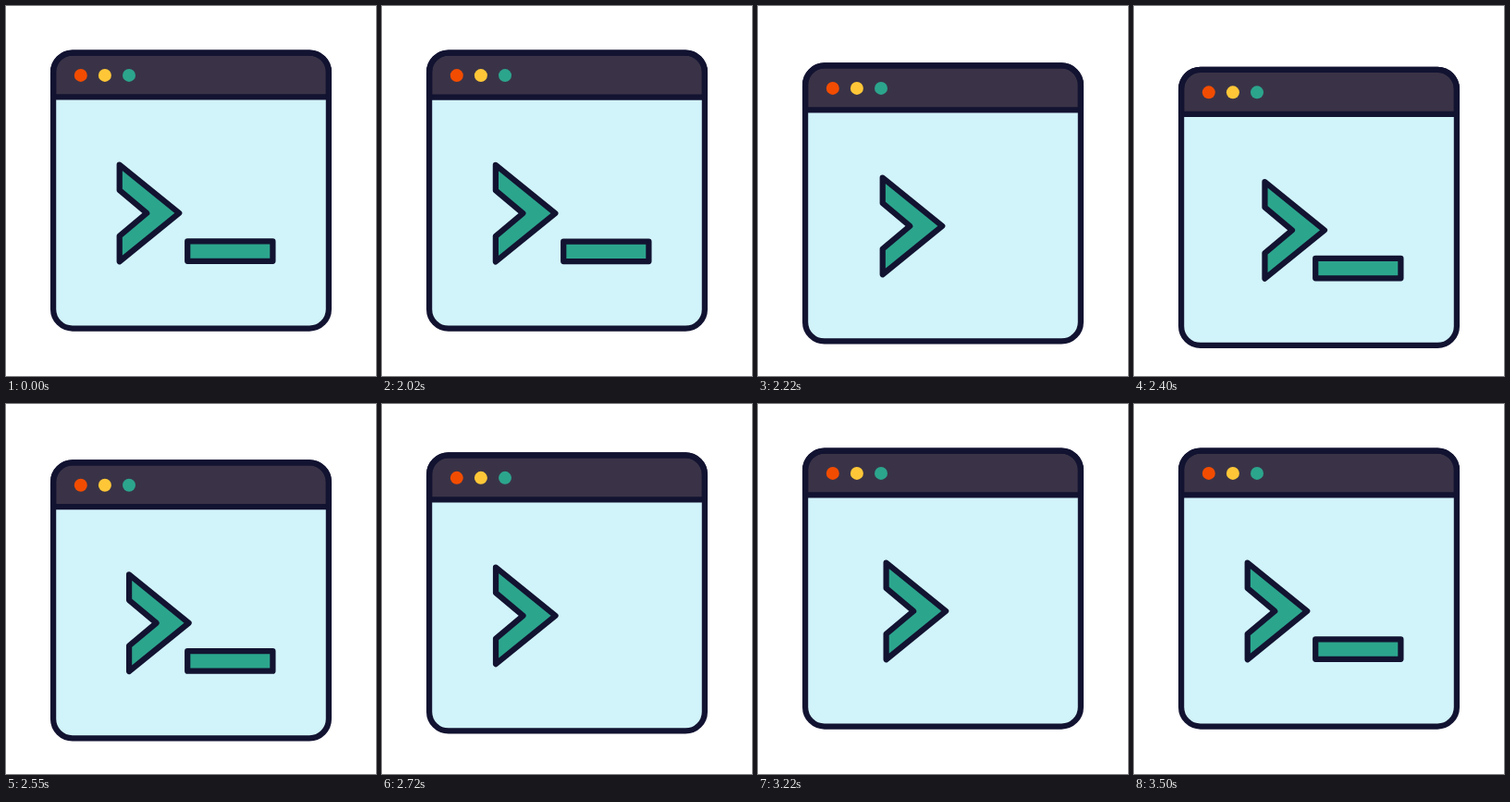
Write an HTML page that moves like this. It is 400 by 400 pixels and loops after 3.52 s.

```html
<!DOCTYPE html>
<html lang="en">
<head>
<meta charset="utf-8">
<title>Terminal</title>
<style>
  html, body { margin: 0; width: 100%; height: 100%; overflow: hidden; background: #fff; }
  svg { display: block; width: 100%; height: 100%; }
  .ink { stroke: #121331; stroke-width: 6.25; stroke-linejoin: round; }
</style>
</head>
<body>
<svg viewBox="0 0 400 400">
  <g id="win">
    <rect x="51.1" y="50.5" width="297.8" height="298" rx="20.8" fill="#d1f3fa"/>
    <path class="ink" fill="#3a3347" d="M51.1 98.4V71.3a20.8 20.8 0 0 1 20.8-20.8h256.2a20.8 20.8 0 0 1 20.8 20.8v27.1z"/>
    <rect class="ink" x="51.1" y="50.5" width="297.8" height="298" rx="20.8" fill="none"/>
    <circle cx="80.8" cy="74.9" r="7" fill="#f24c00"/>
    <circle cx="106.9" cy="74.9" r="7" fill="#ffc738"/>
    <circle cx="133" cy="74.9" r="7" fill="#2ca58d"/>
    <path id="prompt" class="ink" fill="#2ca58d" d="M122.7 171.6L187.2 223.9L122.7 276.2V248.6L152.2 223.9L122.7 199.2z"/>
    <rect id="cursor" class="ink" fill="#2ca58d" x="196.2" y="254.4" width="92.2" height="21.4"/>
  </g>
</svg>
<script>
const LOOP = 3520, START = 2000, SHIFT = 19;
const [win, prompt, cursor] = ['win', 'prompt', 'cursor'].map(id => document.getElementById(id));

const clamp = x => Math.min(1, Math.max(0, x));
const smooth = x => x * x * (3 - 2 * x);

// cubic-bezier(1/3, 0, 1/3, 1): quick start, long settle
function settle(x) {
  let lo = 0, hi = 1;
  for (let i = 0; i < 24; i++) {
    const u = (lo + hi) / 2, v = 1 - u;
    if (u * v * v + u * u * v + u * u * u < x) lo = u; else hi = u;
  }
  return smooth((lo + hi) / 2);
}

function draw(now) {
  const t = clamp((now % LOOP - START) / 1500) * 1500;
  const dip = t < 333 ? smooth(t / 333) : 1 - settle(clamp((t - 333) / 750));
  const swing = smooth(1 - Math.abs(t % 750 / 375 - 1));
  const blink = t % 500;

  win.setAttribute('transform', `translate(0 ${SHIFT * dip})`);
  prompt.setAttribute('transform', `translate(${SHIFT * swing} 0)`);
  cursor.setAttribute('visibility', blink >= 125 && blink < 375 ? 'hidden' : 'visible');
}

const begin = performance.now();
function tick() {
  draw(performance.now() - begin);
  requestAnimationFrame(tick);
}
tick();
</script>
</body>
</html>
```
